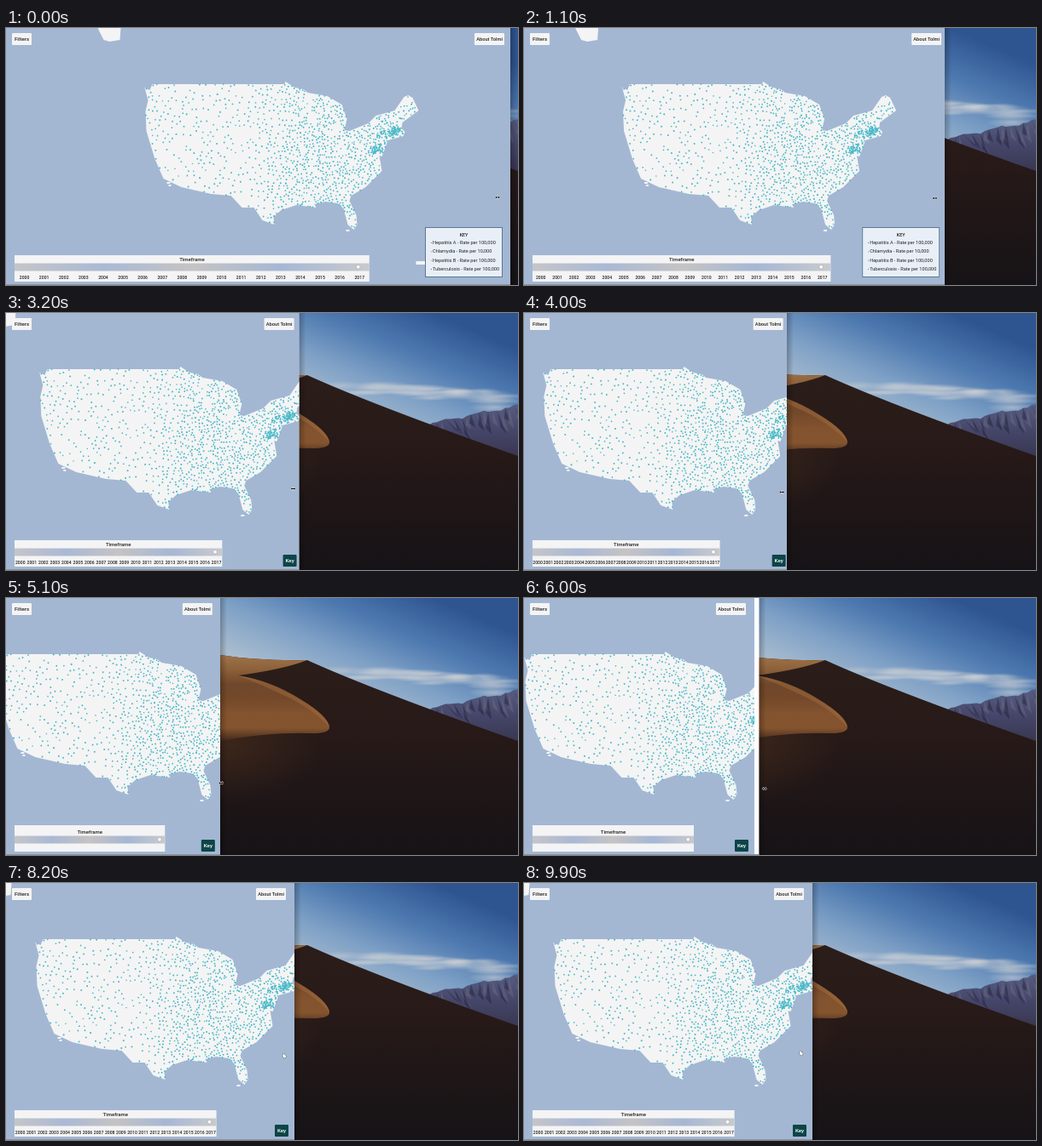
Animation, 600 px wide and 302 px high, one loop 10000 ms. Source, as an HTML page with a canvas:

```html
<!DOCTYPE html>
<html lang="en">
<head>
<meta charset="utf-8">
<title>Responsive health map</title>
<style>
html, body { margin: 0; width: 100%; height: 100%; overflow: hidden; background: #1b1517; }
canvas { display: block; width: 600px; height: 302px; }
</style>
</head>
<body>
<canvas id="stage"></canvas>
<script>
const W = 600, H = 302, LOOP = 10000, STEP = 100;
const canvas = document.getElementById('stage');
const dpr = window.devicePixelRatio || 1;
canvas.width = W * dpr;
canvas.height = H * dpr;
const ctx = canvas.getContext('2d');

// Drag of the window edge: seconds, position, speed
const DRAG = [
  [0, 591, -30], [1.1, 493, -50], [2.3, 400, -100], [4, 308, -60],
  [5.1, 251, 0], [6.6, 329, 120], [6.8, 338, 0]
];

function edgeAt(ms) {
  const s = ms / 1000, last = DRAG[DRAG.length - 1];
  if (s <= 0) return DRAG[0][1] + DRAG[0][2] * s;
  if (s >= last[0]) return last[1];
  const i = DRAG.findIndex(k => k[0] > s);
  const [t0, x0, v0] = DRAG[i - 1], [t1, x1, v1] = DRAG[i];
  const h = t1 - t0, u = (s - t0) / h, w = 1 - u;
  return x0 * (1 + 2 * u) * w * w + x1 * u * u * (1 + 2 * w) + h * u * w * (v0 * w - v1 * u);
}

const smooth = u => u * u * (3 - 2 * u);
const clamp = u => Math.min(1, Math.max(0, u));

function cursorAt(t) {
  const back = smooth(clamp((t - 7000) / 1500));
  const x = t < 5000 ? edgeAt(t) - 15 * Math.exp(-t / 4200) : edgeAt(t + 80) + 1;
  const y = 199 + 30 * Math.min(1, t / 6600) ** 1.9;
  return [x - 14 * back, y - 29 * back];
}

function rng(seed) {
  return () => {
    seed = (seed * 1664525 + 1013904223) >>> 0;
    return seed / 4294967296;
  };
}

const land = new Path2D('M171 66H326L327 63 338 70 348 72 353 76 376 80 393 90 399 107 396 120 402 121 ' +
  '424 112 433 103 455 97 466 81 471 79 476 82 483 97 464 111 463 118 467 122 465 127 447 132 ' +
  '440 151 437 150 440 168 421 187 404 197 402 203 410 220 411 231 407 237 400 231 395 212 ' +
  '388 206 374 204 361 207 363 211 340 208 322 214 313 222 314 231 300 226 290 211 276 211 ' +
  '263 197 240 195 205 187 184 177 174 154 164 121 163 98 166 85 162 70 168 73Z');
const isles = new Path2D('M107 0L114 14 121 16 133 14 134 0ZM480 274H491V278H480Z' +
  'M188 181h4v2h-4ZM190 184h3v2h-3ZM398 237h4v2h-4Z');

// Cases: sparse in the west, crowded in the south-east and around the big ports
function makeDots() {
  const rand = rng(77), spots = [], path = new Path2D();
  const gauss = () => rand() + rand() + rand() - 1.5;
  const add = (x, y, gap) => {
    if (!ctx.isPointInPath(land, x, y)) return;
    if (spots.some(s => Math.hypot(s[0] - x, s[1] - y) < gap)) return;
    spots.push([x, y]);
    const r = 0.8 + rand() * 0.25;
    path.moveTo(x + r, y);
    path.arc(x, y, r, 0, 7);
  };
  for (let i = 0; i < 5200; i++) {
    const x = 162 + rand() * 322, y = 66 + rand() * 170;
    const east = clamp((x - 285) / 60), south = clamp((y - 90) / 40);
    if (rand() < 0.28 + east * (0.2 + 0.45 * south)) add(x, y, 4.2 - 2 * east);
  }
  const cluster = (n, x, y, length, spread) => {
    for (let i = 0; i < n; i++) {
      const along = gauss() * length;
      add(x + along + gauss() * spread, y - along * 0.6 + gauss() * spread, 0.9);
    }
  };
  cluster(90, 454, 123, 7, 4);
  cluster(80, 433, 143, 5, 6);
  cluster(60, 446, 121, 16, 12);
  return path;
}
const dots = makeDots();

function box(x, y, w, h, fill, r = 0) {
  ctx.fillStyle = fill;
  ctx.beginPath();
  ctx.roundRect(x, y, w, h, r);
  ctx.fill();
}

function label(text, x, y, size, align = 'center', fill = '#222', weight = 500) {
  ctx.font = `${weight} ${size}px Roboto, "Liberation Sans", sans-serif`;
  ctx.textAlign = align;
  ctx.textBaseline = 'middle';
  ctx.fillStyle = fill;
  ctx.fillText(text, x, y);
}

// Linear gradient with evenly spaced colours
function ramp(x0, y0, x1, y1, ...colors) {
  const g = ctx.createLinearGradient(x0, y0, x1, y1);
  colors.forEach((c, i) => g.addColorStop(i / (colors.length - 1), c));
  return g;
}

function shape(d, fill) {
  ctx.fillStyle = fill;
  ctx.fill(new Path2D(d));
}

function glow(x, y, rx, ry, rgb, alpha) {
  ctx.save();
  ctx.translate(x, y);
  ctx.scale(rx, ry);
  const g = ctx.createRadialGradient(0, 0, 0, 0, 0, 1);
  g.addColorStop(0, `rgba(${rgb},${alpha})`);
  g.addColorStop(1, `rgba(${rgb},0)`);
  ctx.fillStyle = g;
  ctx.fillRect(-1, -1, 2, 2);
  ctx.restore();
}

function drawMountains() {
  const rand = rng(5), ridge = [];
  for (let x = 490; x <= 606; x += 5) {
    ridge.push([x, 132 - (x - 490) * 0.21 - 3 * Math.sin((x - 490) / 14) ** 2 + rand() * 2]);
  }
  const body = 'M' + ridge.map(p => p.join(' ')).join('L') + 'V175H490Z';
  shape(body, ramp(0, 108, 0, 168, '#565d80', '#45466a', '#393750'));
  ridge.forEach(([x, y], i) => {
    const tone = i % 2 ? 'rgba(26,25,50,.4)' : 'rgba(135,124,140,.28)';
    const lean = 4 + rand() * 14, drop = 12 + rand() * 22;
    shape(`M${x} ${y}L${x + lean} ${y + drop}L${x + lean - 7} ${y + drop * 0.7}Z`, tone);
  });
}

function drawDesktop() {
  ctx.fillStyle = ramp(500, 0, 440, 140, '#2f5591', '#4c78af', '#7fa1c6', '#a9bccf');
  ctx.fillRect(0, 0, W, H);
  const rand = rng(21);
  for (let i = 0; i < 30; i++) {
    const x = 385 + rand() * 200;
    glow(x, 80 + (x - 385) * 0.06 + rand() * 14, 18 + rand() * 32, 2.5 + rand() * 4, '208,210,213', 0.45);
  }
  glow(572, 111, 30, 7, '208,210,213', 0.6);
  drawMountains();
  const dune = 'M0 67H251Q295 74 353 73Q430 108 600 168V302H0Z';
  shape(dune, ramp(0, 73, 0, 302, '#2b1d19', '#281a18', '#1f1617', '#161316'));
  glow(251, 172, 120, 70, '84,52,28', 0.5);
  const sand = ramp(0, 67, 0, 170, '#a0744a', '#8c6039', '#70472b', '#74492a', '#83532f', '#84542f', '#38231a');
  shape('M0 67H251Q295 74 353 73Q325 84 272 91Q310 97 345 119Q378 139 379 152Q379 159 360 159Q310 157 251 168H0Z', sand);
  shape('M272 91Q310 97 345 119Q378 139 379 152Q360 130 325 114Q298 101 272 91Z', 'rgba(170,115,65,.4)');
}

function drawTimeline(page) {
  const w = page * 0.7, cell = w / 18, x = 10;
  const years = page > 290, dy = years ? 0 : 3;
  box(x, 267, w, 31, '#f4f4f5');
  ctx.fillStyle = ramp(x, 0, x + w, 0, '#c5c5c9', '#aab9d4', '#c5c3c4', '#a6b7d4', '#c9cacd');
  ctx.fillRect(x, 276.5 + dy, w, 9);
  label('Timeframe', x + w / 2, 272.5 + dy, 6);
  for (let i = 0; years && i < 18; i++) label(2000 + i, x + cell * (i + 0.5), 293, 5.1);
  ctx.beginPath();
  ctx.arc(x + w - cell / 2 - 1.5, 280.8 + dy, 2.3, 0, 7);
  ctx.fillStyle = '#fff';
  ctx.fill();
  ctx.lineWidth = 0.6;
  ctx.strokeStyle = '#a3a5aa';
  ctx.stroke();
}

const LINES = ['Hepatitis A - Rate per 100,000', 'Chlamydia - Rate per 10,000',
  'Hepatitis B - Rate per 100,000', 'Tuberculosis - Rate per 100,000'];

function drawKey(page) {
  if (page < 360) {
    box(page - 23, 284, 16, 14, '#0c4548', 1);
    label('Key', page - 15, 291.3, 6.2, 'center', '#fff');
    return;
  }
  const x = page - 103;
  box(x, 234, 91, 59, '#e9eff6');
  ctx.lineWidth = 1;
  ctx.strokeStyle = '#587993';
  ctx.strokeRect(x + 0.5, 234.5, 90, 58);
  label('KEY', x + 45.5, 243.3, 5.4);
  LINES.forEach((line, i) => {
    const y = 252.4 + i * 10.3;
    box(x + 7, y - 0.3, 0.9, 0.9, '#50646f');
    label(line, x + 9, y, 5.6, 'left', '#222', 400);
  });
}

function drawPage(edge, page) {
  ctx.save();
  ctx.beginPath();
  ctx.rect(0, 0, edge, H);
  ctx.clip();
  box(0, 0, edge, H, '#fff');
  ctx.beginPath();
  ctx.rect(0, 0, page, H);
  ctx.clip();
  box(0, 0, page, H, '#a3b7d3');
  ctx.save();
  ctx.translate((page - 593) / 2, 0);
  ctx.fillStyle = '#f4f4f4';
  ctx.fill(land);
  ctx.fill(isles);
  ctx.fillStyle = '#49b9c9';
  ctx.fill(dots);
  ctx.restore();
  box(7, 6, 23, 14, '#f4f4f5', 1);
  label('Filters', 18.5, 13.3, 6.1);
  box(page - 45, 6, 35, 14, '#f4f4f5', 1);
  label('About Tolmi', page - 27.5, 13.3, 5.7);
  drawTimeline(page);
  drawKey(page);
  ctx.restore();
  box(0, 301, edge, 1, '#8b949f');
}

function drawCursor(x, y, hand) {
  ctx.save();
  ctx.translate(x, y);
  const p = new Path2D(hand
    ? 'M-1.5 -2.5H0V-1L2 0L1 2.6H-1L-2.2 .6Z'
    : 'M-2.8 0L-1.2 -1.5V-.5H1.2V-1.5L2.8 0L1.2 1.5V.5H-1.2V1.5Z');
  ctx.lineWidth = hand ? 0.7 : 1;
  ctx.strokeStyle = hand ? '#333' : '#fff';
  ctx.stroke(p);
  ctx.fillStyle = hand ? '#fff' : '#111';
  ctx.fill(p);
  ctx.restore();
}

function draw(t) {
  const edge = edgeAt(t), page = edgeAt(t - STEP);
  ctx.setTransform(dpr, 0, 0, dpr, 0, 0);
  drawDesktop();
  ctx.fillStyle = ramp(edge, 0, edge + 8, 0, 'rgba(0,0,0,.25)', 'rgba(0,0,0,0)');
  ctx.fillRect(edge, 0, 8, H);
  drawPage(edge, page);
  drawCursor(...cursorAt(t), t > 7000);
}

const start = performance.now();
let shown = -1;
function tick(now) {
  const t = Math.floor(Math.max(0, now - start) % LOOP / STEP) * STEP;
  if (t !== shown) draw(shown = t);
  requestAnimationFrame(tick);
}
draw(0);
requestAnimationFrame(tick);
</script>
</body>
</html>
```
